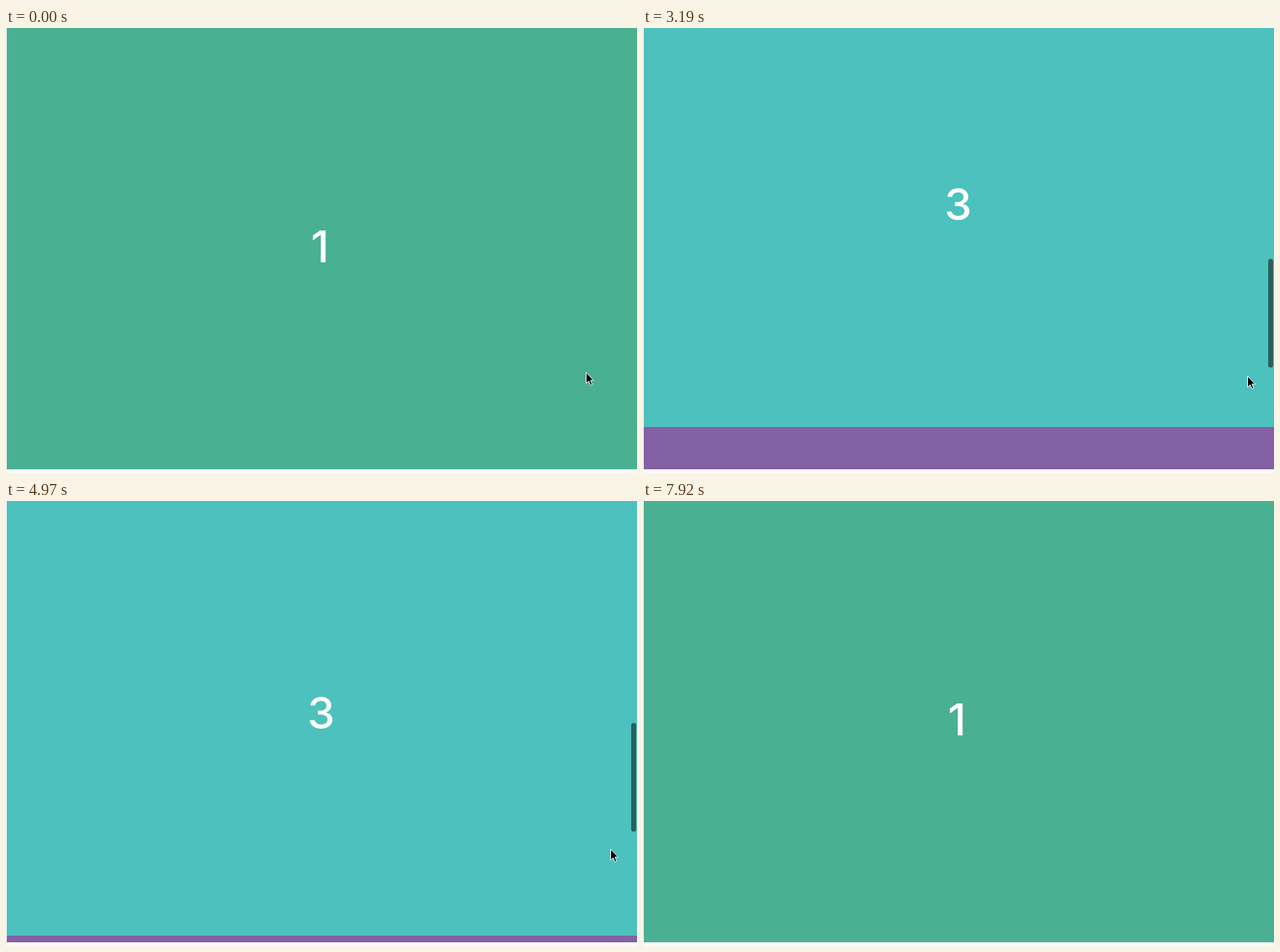
Write an HTML page that moves like this. It is 850 px wide and 600 px high and loops after 8.19 s.

```html
<!DOCTYPE html>
<html lang="en">
<head>
<meta charset="utf-8">
<title>Section scroll</title>
<style>
  html, body { margin: 0; width: 100%; height: 100%; overflow: hidden; background: #fff; }
  svg { display: block; width: 850px; height: 600px; }
  text { font: 500 59px Inter, "Liberation Sans", sans-serif; fill: #fff; text-anchor: middle; }
</style>
</head>
<body>
<svg viewBox="0 0 850 600">
  <defs><clipPath id="view"><rect x="1" width="849" height="595"/></clipPath></defs>
  <rect y="595" width="850" height="5" fill="#fafafa"/>
  <g clip-path="url(#view)">
    <g id="page"></g>
    <rect id="bar" x="842" width="7" height="147" rx="3.5" fill="#000" fill-opacity=".5"
      stroke="#fff" stroke-opacity=".12"/>
    <path id="cursor" d="M.5 .5V15.2L3.9 12L6.3 17.6L8.7 16.6L6.3 11.1H10.6Z" fill="#000" stroke="#fff"/>
  </g>
</svg>
<script>
const LOOP = 8190, TICK = 118.15, H = 600, CROP = 5;
const colors = ['#4ab092', '#c94e4a', '#4cc1be', '#8360a4'];
const digitX = [423, 424.5, 424.5, 424.5];
// start tick, direction, speed per tick
const moves = [
  [8.4, 1, 1.4], [17.362, 1, 1.4], [26.632, 1, 1.4],
  [35.41, -1, .93], [43.95, -1, .93], [52.06, -1, .93]
];
// from tick, x, y
const cursorStops = [[0, 781, 464], [1, 783, 471], [3, 814, 469]];
const barFade = { 65: .66, 66: .33 };

const $ = id => document.getElementById(id);
const page = $('page'), bar = $('bar'), cursor = $('cursor');

page.innerHTML = colors.map((c, i) =>
  `<rect y="${i * H}" width="850" height="${H}" fill="${c}"/>` +
  `<text x="${digitX[i]}" y="${i * H + 321}">${i + 1}</text>`).join('');

// critically damped approach to the next snap point
function ease(x) {
  if (x <= 0) return 0;
  return x > 8.8 ? 1 : 1 - (1 + x) * Math.exp(-x);
}

function scrollAt(k) {
  return Math.round(H * moves.reduce((sum, [start, dir, speed]) =>
    sum + dir * ease(speed * (k - start)), 0));
}

function place(el, x, y) {
  el.setAttribute('transform', `translate(${x} ${y})`);
}

function draw(ms) {
  const k = Math.min(67, Math.floor((ms % LOOP + 9) / TICK));
  const s = scrollAt(k);
  place(page, 0, -s - CROP);
  place(bar, 0, Math.round(-3 + s * .25));
  bar.setAttribute('opacity', k < 9 || k > 66 ? 0 : barFade[k] ?? 1);
  const [, x, y] = cursorStops.filter(c => c[0] <= k).pop();
  place(cursor, x, y);
  cursor.setAttribute('opacity', k < 62 ? 1 : 0);
}

const begin = performance.now();
function frame() {
  draw(performance.now() - begin);
  requestAnimationFrame(frame);
}
frame();
</script>
</body>
</html>
```
